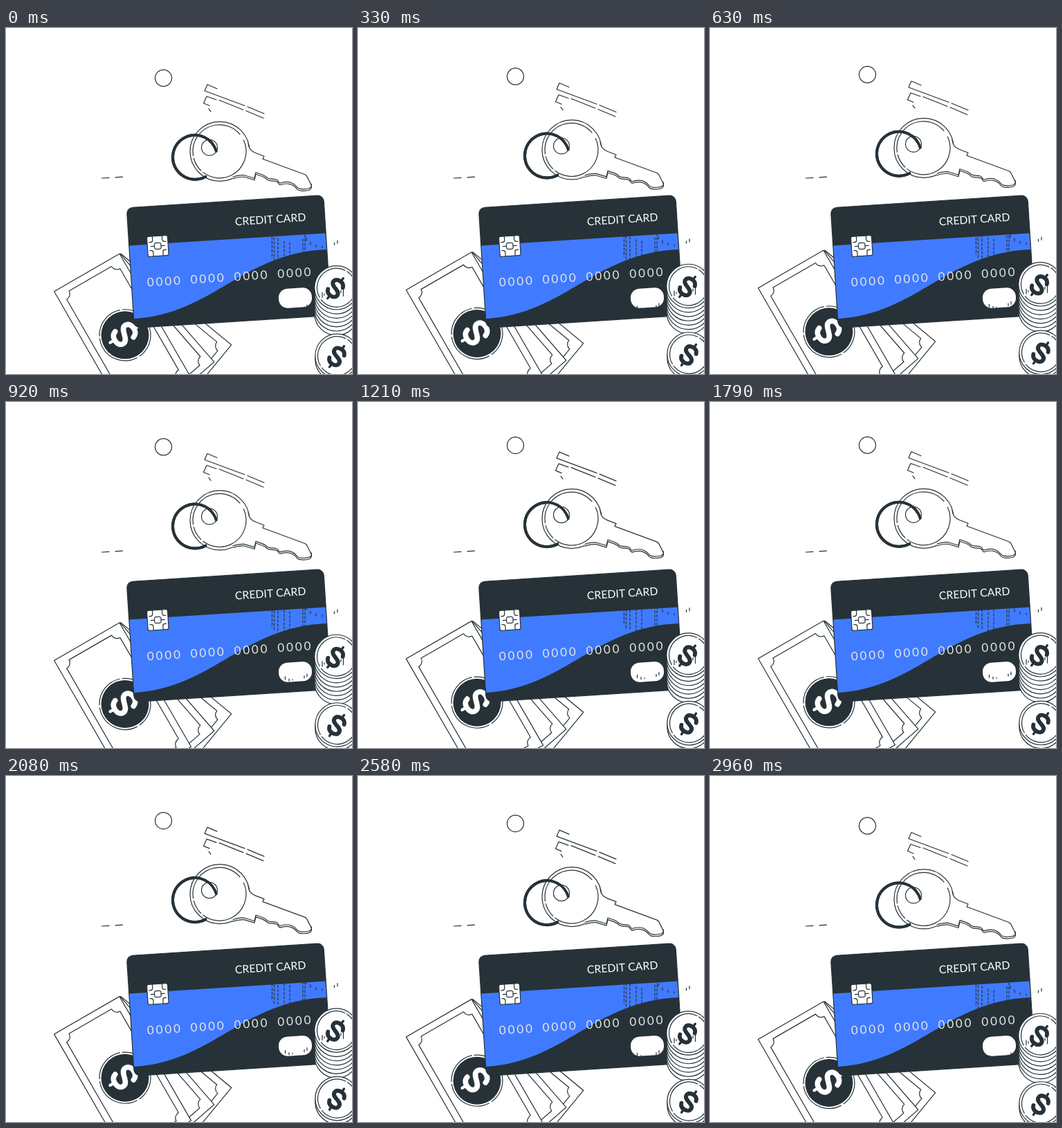
These frames come from a looping animation (500 by 500 pixels, 3 s). An HTML page with a canvas:

```html
<!DOCTYPE html>
<html lang="en">
<head>
<meta charset="utf-8">
<title>Credit card and cash</title>
<style>
html, body { margin: 0; width: 100%; height: 100%; overflow: hidden; background: #fff; }
canvas { display: block; width: 500px; height: 500px; }
</style>
</head>
<body>
<canvas id="stage" width="500" height="500"></canvas>
<script>
const ctx = document.getElementById("stage").getContext("2d");
const INK = "#263238", BLUE = "#407bff", WHITE = "#fff", PALE = "#e6e6e6";
const LOOP = 3000, STEPS = 72, RISE = 12, REST = 0.8;
const TILT = -3.66;
const rad = d => d * Math.PI / 180;

function stroke(path, width = 1.2, color = INK) {
  ctx.lineWidth = width;
  ctx.strokeStyle = color;
  ctx.stroke(path);
}

function fill(path, color = WHITE) {
  ctx.fillStyle = color;
  ctx.fill(path);
}

function shape(d, width) {
  stroke(new Path2D(d), width);
}

function arc(x, y, r, from = 0, to = 360) {
  const p = new Path2D();
  p.arc(x, y, r, rad(from), rad(to));
  return p;
}

function placed(x, y, deg, draw) {
  ctx.save();
  ctx.translate(x, y);
  ctx.rotate(rad(deg));
  draw();
  ctx.restore();
}

function dollar(x, y, deg, scale, color) {
  placed(x, y, deg, () => {
    ctx.scale(scale, scale);
    stroke(new Path2D("M7.5-7C6-11 3-12 0-12C-5-12-8-9.5-8-6C-8-2-4-1 0 0" +
      "C4 1 8 2 8 6C8 9.5 5 12 0 12C-3 12-6 11-7.5 7"), 5.6, color);
    stroke(new Path2D("M0-12V-17.5M0 12V17.5"), 3.2, color);
  });
}

// x runs along the note's length, y across it
function bill(x, y, deg) {
  const len = 207, wide = 109, inset = 10, r = 9;
  placed(x, y, deg, () => {
    const edge = new Path2D();
    edge.rect(0, 0, len, wide);
    fill(edge);
    stroke(edge);
    const frame = new Path2D();
    const a = inset, b = len - inset, c = wide - inset;
    [[a, a], [b, a], [b, c], [a, c]].forEach(([px, py], i) =>
      frame.arc(px, py, r, rad(90 + 90 * i), rad(90 * i), true));
    frame.closePath();
    stroke(frame);
  });
}

function bills() {
  bill(166, 325.5, 39.5);
  bill(165, 325.5, 49);
  bill(164, 325.5, 60);
  fill(arc(172, 443, 37));
  fill(arc(172, 443, 34.5), INK);
  stroke(arc(172, 443, 37, 62, 172));
  stroke(arc(172, 443, 37, 178, 258));
  stroke(arc(172, 443, 37, 264, 415));
  dollar(171, 442, 60, 1.35, WHITE);
}

const SHAFT = "M350 166C351 174 354 177 361 180L373 184.5L371 188.5" +
  "L432 211Q434 212 435 214L441 226";
const TEETH = "Q443 231 438 233.5Q434 235 427 234.5Q423 234.5 420.5 232" +
  "Q417 227 411 225Q404 223 396 226Q394 225 392.5 222Q390 220 384 220" +
  "Q378 220 375.5 216.5L371 214L361 210.5L359 219L344 214.5Q335 214 328 217";

function key() {
  stroke(arc(273, 186, 32), 4);
  const head = arc(309, 177.5, 43);
  fill(head);
  stroke(head);
  fill(new Path2D(SHAFT + TEETH + "L309 190Z"));
  shape(SHAFT + TEETH);
  ctx.save();
  ctx.translate(0, -2.6);
  shape("M441 227" + TEETH);
  ctx.restore();
  const face = arc(308.5, 177.5, 38.5);
  fill(face);
  stroke(arc(308.5, 177.5, 38.5, -25, 128));
  stroke(arc(308.5, 177.5, 38.5, 134, 165));
  stroke(arc(308.5, 177.5, 38.5, 171, 320));
  const hole = arc(294, 172, 11.5);
  fill(hole);
  stroke(hole);
  stroke(arc(273, 186, 32, 61, 344), 4);
}

function scraps() {
  stroke(arc(227.5, 71.5, 12));
  shape("M305 87L291 81L287 90L345 111.5M349 113L373 123");
  shape("M304 103L290 98L285.5 108L294 111.5M308 103.5L343 117.5M347 119L372 129.5");
  shape("M293 116L296 120");
}

function chip() {
  placed(219.3, 315, TILT, () => {
    const p = new Path2D();
    p.roundRect(-15, -14.5, 30, 29, 2.5);
    fill(p);
    stroke(p);
    const core = new Path2D();
    core.roundRect(-4.7, -4.5, 9.4, 9, 2);
    stroke(core);
    for (const side of [-1, 1]) {
      ctx.save();
      ctx.scale(side, 1);
      shape("M7-14V-9Q7-6 10-6H12M7 14V9Q7 6 10 6H12M5 0H10");
      ctx.restore();
    }
  });
}

function label(text, x, y, font, gap, color) {
  placed(x, y, TILT, () => {
    ctx.font = font;
    ctx.letterSpacing = gap + "px";
    ctx.fillStyle = color;
    ctx.fillText(text, 0, 0);
  });
}

function card() {
  const edge = new Path2D();
  edge.roundRect(0, 0, 285, 174, 9);
  ctx.save();
  ctx.translate(174.3, 259.8);
  ctx.rotate(rad(TILT));
  fill(edge, INK);
  ctx.save();
  ctx.clip(edge);
  ctx.rotate(rad(-TILT));
  ctx.translate(-174.3, -259.8);
  fill(new Path2D("M170 315.1L470 295.9V319.6L463 320C342 325 300 412.5 186 420L170 421Z"), BLUE);
  ctx.restore();
  stroke(edge);
  ctx.restore();
  chip();
  label("CREDIT CARD", 331.3, 285.4, "400 15.8px Lato, sans-serif", 0, WHITE);
  for (let i = 0; i < 4; i++)
    label("0000", 204.3 + 62.8 * i, 373.6 - 4.1 * i, "400 17px Lato, sans-serif", 2.9, PALE);
  placed(418, 390, TILT, () => {
    const p = new Path2D();
    p.roundRect(-24, -14, 48, 28, 13);
    fill(p);
  });
}

function coin(x, y, layers, gap) {
  for (let i = layers; i >= 0; i--) {
    const disc = arc(x, y + i * gap, 31.7);
    fill(disc);
    stroke(disc);
  }
  stroke(arc(x, y, 28, 20, 142));
  stroke(arc(x, y, 28, 150, 296));
  stroke(arc(x, y, 28, 303, 372));
}

function coins() {
  coin(477.5, 374.5, 6, 6.2);
  dollar(476, 375.5, 38, 1.05, INK);
  coin(478.5, 473, 1, 5);
  dollar(478, 474, 35, 1.05, INK);
}

// [x, top, bottom]
const columns = [[384.5, 301, 332], [387.5, 302, 337], [393, 303, 338],
  [402, 307, 342], [410, 309, 342], [429, 304, 336], [432, 298, 338]];
const ticks = [[434, 302, 307], [440, 308, 313], [448, 312, 316], [457, 314, 317],
  [474.5, 309, 313], [479, 306, 311], [403.5, 403, 408], [409, 406, 410],
  [414, 407, 409], [431, 402, 406], [435, 399, 404],
  [457, 381, 389], [460, 383, 386], [484, 378, 382], [487.5, 375, 387]];

function marks() {
  const vertical = ([x, a, b]) => shape(`M${x} ${a}V${b}`);
  ctx.lineCap = "butt";
  ctx.setLineDash([4, 2]);
  columns.forEach(vertical);
  ctx.setLineDash([]);
  ticks.forEach(vertical);
}

function lifted(dy, ...parts) {
  ctx.save();
  ctx.translate(0, dy);
  parts.forEach(part => part());
  ctx.restore();
}

function frame() {
  const step = Math.floor((performance.now() % LOOP) / LOOP * STEPS);
  const dy = REST - RISE * (1 - Math.abs(1 - 2 * step / STEPS));
  ctx.fillStyle = WHITE;
  ctx.fillRect(0, 0, 500, 500);
  ctx.lineCap = ctx.lineJoin = "round";
  shape("M138.5 217L149 216.3M158 215.9L168.5 215.2");
  lifted(dy, bills, key, scraps);
  card();
  lifted(dy, coins, marks);
  requestAnimationFrame(frame);
}
frame();
</script>
</body>
</html>
```
